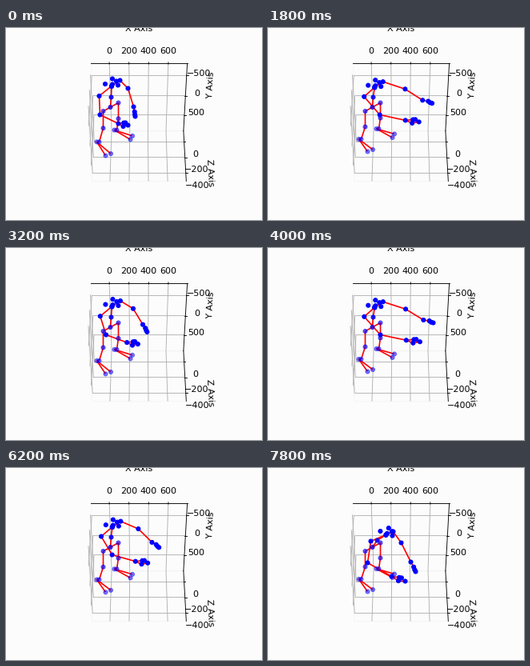
A matplotlib script that plays this animation: 320 px wide and 240 px high, repeating every 8 s.

```python
import numpy as np
import matplotlib.pyplot as plt
from matplotlib.animation import FuncAnimation
from matplotlib.collections import LineCollection

W, H, DPI = 320, 240, 80
FRAMES, STEP = 40, 200
PAPER = "#fcfcfc"

fig = plt.figure(figsize=(W / DPI, H / DPI), dpi=DPI, facecolor=PAPER)
box = fig.add_subplot(projection="3d", facecolor=PAPER)
box.view_init(elev=-45, azim=-90)
box.set(xlim=(-185, 793), ylim=(-788, 932), zlim=(-499, 151),
        xlabel="X Axis", ylabel="Y Axis", zlabel="Z Axis")
box.set_xticks(range(0, 601, 200))
box.set_yticks(range(-500, 501, 500))
box.set_zticks(range(-400, 1, 200))
for axis in (box.xaxis, box.yaxis, box.zaxis):
    axis.pane.set_facecolor(PAPER)
    axis.pane.set_edgecolor("0.95")

# Skeleton layer, measured at pixel centres
flat = fig.add_axes([0, 0, 1, 1])
flat.set(xlim=(-0.5, W - 0.5), ylim=(H - 0.5, -0.5))
flat.axis("off")


def points(*xy):
    return np.array(xy, float)


# Each arm: shoulder, elbow, wrist, fingertip
GUARD = points((142, 65), (152, 75), (159, 98), (161, 110),
               (116, 84.5), (117, 108), (140, 119), (152, 121))
PUSH = points((143.5, 67), (175, 76), (200, 88), (214, 90),
              (120.5, 85.5), (144, 108), (178, 114), (196, 116))
BENT = points((156, 79), (166, 93), (178, 117), (184, 129),
              (128, 91), (124, 118), (154, 135), (171, 141))

# Each leg: hip, knee, ankle, two toes
RIGHT_LEG = points((140, 93), (140, 112), (138, 125.5), (157.5, 132), (155, 136.5))
LEFT_LEG = points((121, 103.5), (121, 123), (116, 138.5), (124, 154), (130.5, 151.5))
PELVIS = points((130, 98.5))[0]
DEPTH = np.array([0, 1, 2, 3, 3])
LEG_ALPHA = [0.6, 0.6, 0.5, 0.5, 0.5, 0.5]

HEAD = points((1, -9), (-8, -2.5), (6, -6), (8, -1), (1, -2), (0, 0.5))

# time in ms, how far the arms are stretched out
REACH = [(0, 0), (1600, 0.9), (2700, 0), (4000, 0.85), (4600, 0), (5200, 1),
         (5700, 0), (6200, 0.56), (6700, 0), (7400, 1.15), (8000, 0.5)]


def ease(u):
    u = np.clip(u, 0, 1)
    return u * u * (3 - 2 * u)


def lerp(a, b, u):
    return a + (b - a) * u


def reach_at(ms):
    for (t0, a), (t1, b) in zip(REACH, REACH[1:]):
        if ms <= t1:
            return lerp(a, b, ease((ms - t0) / (t1 - t0)))


def turn(shape, angle):
    c, s = np.cos(angle), np.sin(angle)
    return shape @ np.array([(c, s), (-s, c)])


def fingers(wrist, tip, spread):
    """Points along the hand, each as (share of its length, drop)."""
    return points(*(lerp(wrist, tip, u) + (0, drop) for u, drop in spread))


def leg(base, crouch, rate):
    joints = base + np.outer(DEPTH, (0, rate)) * crouch
    heel = joints[2] - (3, 0)
    hip, knee, ankle, toe_a, toe_b = joints
    lines = [[PELVIS, hip, knee, ankle, heel, toe_a], [heel, toe_b]]
    return [hip, knee, ankle, heel, toe_a, toe_b], lines


def body(ms):
    reach, bend = reach_at(ms), ease((ms - 7400) / 400)
    crouch = max(0, 1 - 1.5 * reach)
    arms = lerp(lerp(GUARD, PUSH, reach), BENT, bend)
    rs, re, rw, rt, ls, le, lw, lt = arms
    neck = lerp(lerp(points((131.5, 72)), points((133, 74)), reach),
                points((147, 83)), bend)[0]
    spine = PELVIS + (1 + 5 * bend, -12.5 + 4 * bend)
    head = neck + turn(HEAD, np.radians(15) * bend)
    rh = fingers(rw, rt, [(0.6, -1), (0.8, 0), (1, 0)])
    lh = fingers(lw, lt, [(0.5, 2.5), (0.56, -2), (0.73, -2.5), (1, 0)])
    right, right_lines = leg(RIGHT_LEG, crouch, 0.8)
    left, left_lines = leg(LEFT_LEG, crouch, 1.7)

    upper = [neck, rs, re, rw, ls, le, lw, *head, *rh, *lh]
    dots = points(*upper, spine, PELVIS, *right, *left)
    alpha = [1] * len(upper) + [0.85, 0.72] + LEG_ALPHA * 2
    chains = [[PELVIS, spine, neck], [neck, rs, re, rw, *rh], [neck, ls, le, lw],
              [lw, lh[0], lh[3]], [lw, lh[1], lh[2]], *right_lines, *left_lines]
    return dots, alpha, [points(*c) for c in chains]


bones = LineCollection([], colors="red", linewidths=1.5, zorder=1)
flat.add_collection(bones)
joints = flat.scatter([], [], s=20, color="blue", zorder=2)


def draw(i):
    dots, alpha, chains = body(i * STEP)
    bones.set_segments(chains)
    joints.set_offsets(dots)
    rgba = [(0, 0, 1, a) for a in alpha]
    joints.set_facecolor(rgba)
    joints.set_edgecolor(rgba)
    return bones, joints


anim = FuncAnimation(fig, draw, frames=FRAMES, interval=STEP, repeat=True,
                     init_func=lambda: draw(0), blit=False)
plt.show()
```
